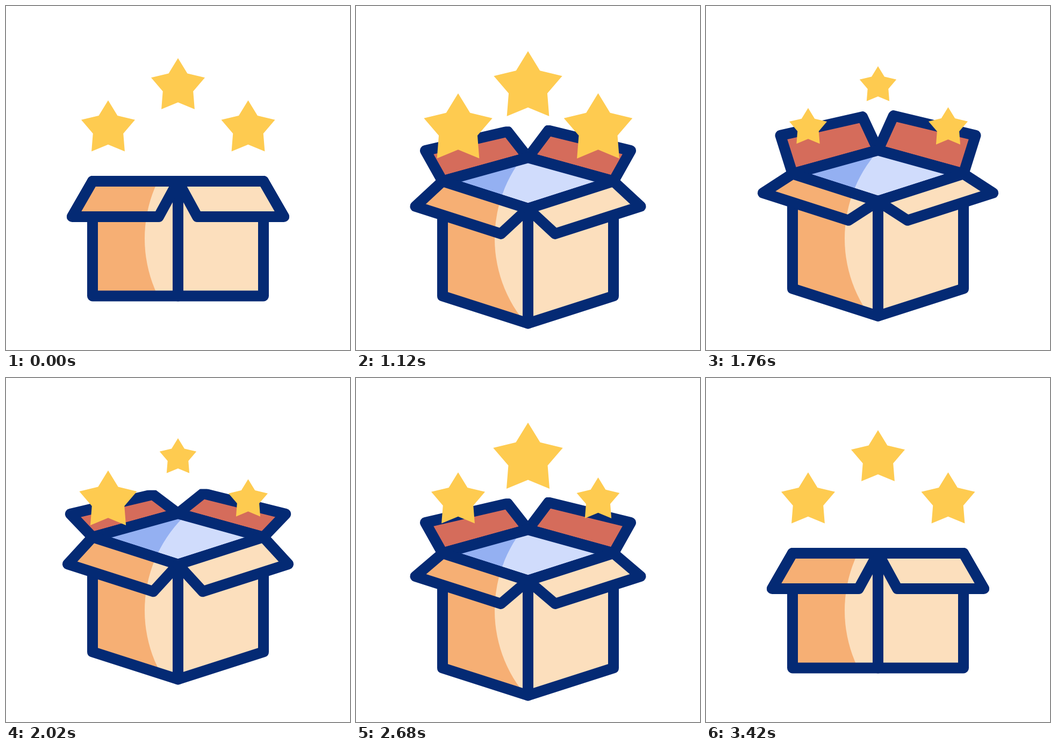
An HTML page with a canvas that plays this animation: 640x640 px, repeating every 3.6 s.

```html
<!DOCTYPE html>
<html lang="en">
<head>
<meta charset="utf-8">
<title>Box and stars</title>
<style>
html, body { margin: 0; width: 100%; height: 100%; overflow: hidden; background: #fff; }
canvas { display: block; width: 640px; height: 640px; }
</style>
</head>
<body>
<canvas id="stage" width="640" height="640"></canvas>
<script>
const ctx = document.getElementById('stage').getContext('2d');
const LOOP = 3600, STEP = 20;
const NAVY = '#042a74', PEACH = '#fcdfbd', ORANGE = '#f6af74', RED = '#d56c5b';
const ICE = '#d0dcfc', BLUE = '#94b0f2', GOLD = '#fecb50';
const LEFT = 161, MID = 320, RIM = 326, HEIGHT = 213.5;

// Sine ease from 0 to 1 between two times
function ease(t, from, to) {
  const u = Math.min(1, Math.max(0, (t - from) / (to - from)));
  return (1 - Math.cos(Math.PI * u)) / 2;
}

// Half-sine jump, zero outside its span
function hop(t, from, to, height) {
  return t > from && t < to ? height * Math.sin(Math.PI * (t - from) / (to - from)) : 0;
}

function trace(points) {
  ctx.beginPath();
  points.forEach(([x, y]) => ctx.lineTo(x, y));
  ctx.closePath();
}

const mirror = points => points.map(([x, y]) => [2 * MID - x, y]);

// A panel is light inside one fixed circle and dark outside it
function panel(points, light, dark) {
  ctx.save();
  trace(points);
  ctx.fillStyle = dark;
  ctx.fill();
  if (light !== dark) {
    ctx.clip();
    ctx.beginPath();
    ctx.arc(503, 432.5, 245, 0, 7);
    ctx.fillStyle = light;
    ctx.fill();
  }
  ctx.restore();
  trace(points);
  ctx.stroke();
}

// Back flaps are cropped a tenth of their height above and below
function backFlap(points) {
  const ys = points.map(p => p[1]);
  const top = Math.min(...ys), h = Math.max(...ys) - top;
  ctx.save();
  ctx.beginPath();
  ctx.rect(0, top - h * 0.1, 640, h * 1.2);
  ctx.clip();
  panel(points, RED, RED);
  ctx.restore();
}

function box(t) {
  const tilt = ease(t, 220, 1000) - ease(t, 2738, 3363);
  const fore = ease(t, 680, 1280) - ease(t, 2740, 3400);
  const aft = ease(t, 250, 1040) - ease(t, 2760, 3420);
  const lift = hop(t, 1290, 1850, 28.4) + hop(t, 1815, 2510, 37.5) + hop(t, 2680, 3400, 43);
  // Flaps droop as the box rises and spread as it lands
  const swing = (lift - 22) * (ease(t, 1290, 1500) - ease(t, 2400, 2620));

  const side = RIM - lift;
  const corner = [LEFT, side];
  const front = [MID, side + 51 * tilt];
  const back = [MID, side - 44 * aft ** 1.5];
  ctx.strokeStyle = NAVY;
  ctx.lineWidth = 20;
  ctx.lineJoin = 'round';

  const outer = [LEFT - 38 + 6 * aft - 1.15 * swing, side + 66 - 123 * aft + 1.75 * swing];
  const inner = [MID - 38 - 1.1 * swing, back[1] + 66 - 114.5 * aft + 1.65 * swing];
  const rear = [corner, back, inner, outer];
  backFlap(rear);
  backFlap(mirror([corner, back, [inner[0], inner[1] - 2], outer]));

  panel([corner, back, [2 * MID - LEFT, side], front], ICE, BLUE);

  const face = [corner, front, [MID, front[1] + HEIGHT], [LEFT, side + HEIGHT]];
  panel(face, PEACH, ORANGE);
  panel(mirror(face), PEACH, PEACH);

  const fx = -38 - 12.5 * tilt + 0.55 * swing;
  const fy = 66 - 23 * fore + 0.9 * swing;
  const flap = [corner, front, [MID + fx + 2 * (1 - tilt), front[1] + fy], [LEFT + fx, side + fy]];
  panel(flap, PEACH, ORANGE);
  panel(mirror(flap), PEACH, PEACH);
}

// All stars pop together once, then each pops again at its own peak
function starScale(t, low, peak) {
  const big = 1.31;
  const pops = ease(t, 530, 1040) - ease(t, 1060, 1440) + ease(t, peak - 460, peak);
  return 1 + (low - 1) * ease(t, 220, 530) + (big - low) * pops
    + (1 - big) * ease(t, peak, peak + 360);
}

function star(x, y, scale) {
  const points = [];
  for (let i = 0; i < 10; i++) {
    const r = (i % 2 ? 29.7 : 52.6) * scale, a = i * Math.PI / 5;
    points.push([x + r * Math.sin(a), y + 5 * scale - r * Math.cos(a)]);
  }
  trace(points);
  ctx.fillStyle = GOLD;
  ctx.fill();
}

function draw(t) {
  ctx.fillStyle = '#fff';
  ctx.fillRect(0, 0, 640, 640);
  box(t);
  star(190, 223, starScale(t, 0.7, 2218));
  star(320, 144.5, starScale(t, 0.684, 2628));
  star(450.5, 223, starScale(t, 0.73, 3038));
}

const start = performance.now();
function tick() {
  const t = (performance.now() - start) % LOOP;
  draw(Math.floor(t / STEP) * STEP);
  requestAnimationFrame(tick);
}
tick();
</script>
</body>
</html>
```
